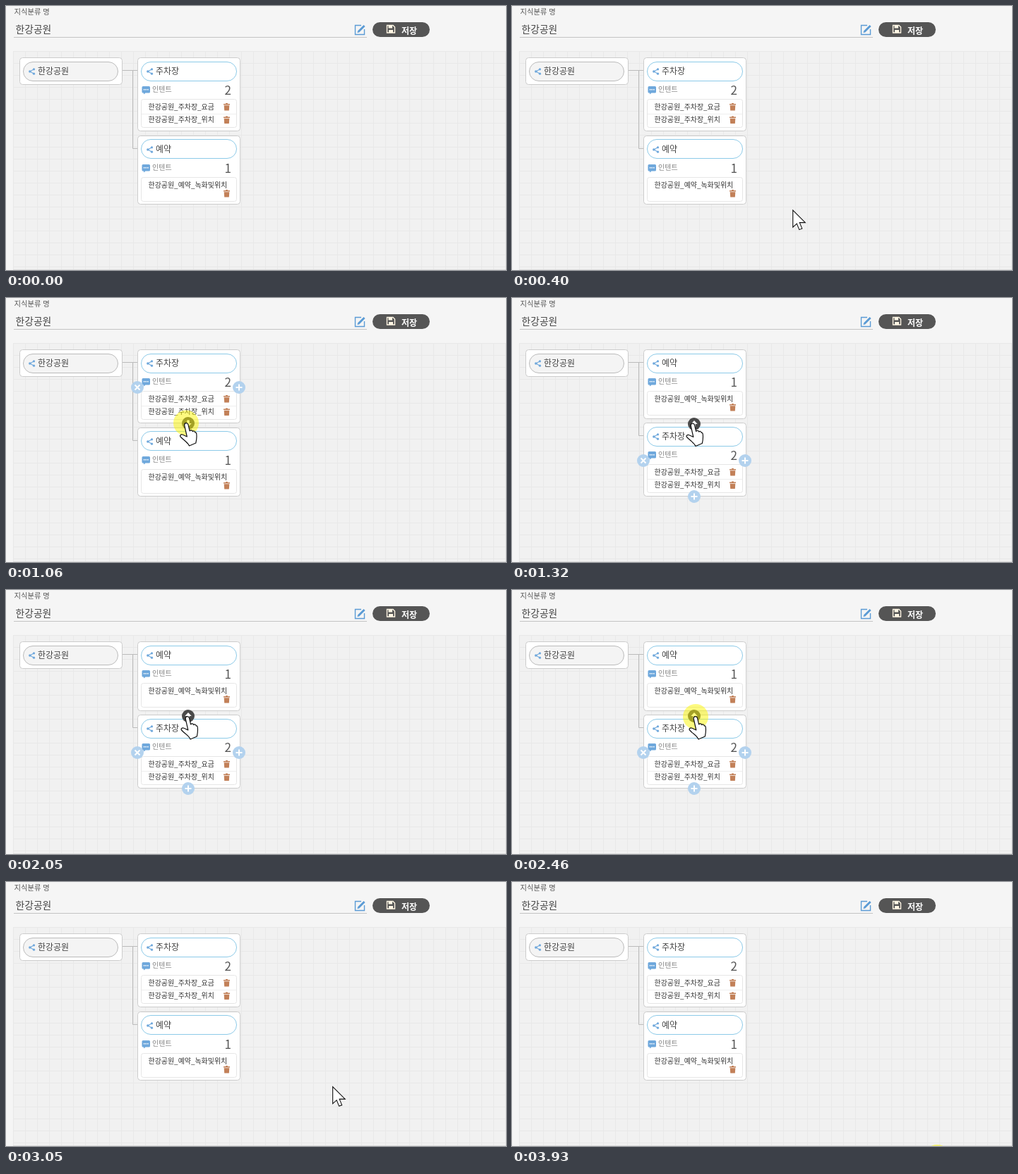
Animation of 708x375 px, one loop 3.99 s. Source, as an HTML page:

```html
<!DOCTYPE html>
<html lang="ko">
<head>
<meta charset="utf-8">
<style>
html, body { margin: 0; width: 100%; height: 100%; overflow: hidden; background: #f5f5f5; }
svg { display: block; font-family: "Noto Sans CJK KR", "Noto Sans", sans-serif; }
</style>
</head>
<body>
<svg width="708" height="375" viewBox="0 0 708 375">
  <defs>
    <pattern id="grid" x="10" y="64" width="17" height="17" patternUnits="userSpaceOnUse">
      <path d="M.5 0V17M0 .5H17" stroke="#e8e8e8" fill="none"/>
    </pattern>
    <g id="share" fill="#6fa8dc">
      <path d="M7.500 1.800L2 5L7.500 8.200" fill="none" stroke="#6fa8dc" stroke-width="1.100"/>
      <circle cx="7.500" cy="1.800" r="1.600"/><circle cx="1.800" cy="5" r="1.700"/><circle cx="7.500" cy="8.200" r="1.600"/>
    </g>
    <g id="chat">
      <path d="M1.500 0H10Q11.500 0 11.500 1.500V8Q11.500 9.500 10 9.500H5L2.500 11.500V9.500H1.500Q0 9.500 0 8V1.500Q0 0 1.500 0Z" fill="#6fa8dc"/>
      <path d="M2.300 4.800h1.600m1 0h1.600m1 0h1.600" stroke="#fff" stroke-width="1.600"/>
    </g>
    <path id="trash" d="M-4.500-4.500H-1.500V-5.500H1.500V-4.500H4.500V-3H-4.500ZM-3.800-2.200H3.800L3.300 5H-3.300Z" fill="#c28058"/>
    <path id="plus" d="M-4.500 0H4.500M0-4.500V4.500" stroke="#fff" stroke-width="2"/>
    <path id="cross" d="M-3.500-3.500L3.500 3.500M3.500-3.500L-3.500 3.500" stroke="#fff" stroke-width="2"/>
    <path id="down" d="M-1.700-4.500H1.700V0H4.700L0 5L-4.700 0H-1.700Z" fill="#fff"/>
    <path id="up" d="M-1.700 4.500H1.700V0H4.700L0-5L-4.700 0H-1.700Z" fill="#fff"/>
    <path id="arrow" d="M0 0V24L5.500 19L9 27.500L13 26L9.500 17.500H17.500Z" fill="#fff" stroke="#111" stroke-width="1.100"/>
    <path id="hand" d="M-2.800 2C-3.200-2 1.500-2.400 2.500 .8L4.600 9.800C6 8.300 8.300 8.800 8.800 10.600C10 9.300 12 10 12.200 12C13.500 11.500 14.200 12.800 14.300 14.500C14.800 19 14.500 22 13.300 27L4 31C2 26-4 23-8.500 18C-9.800 16-7.500 14-5 15.300L.8 18Z"
      fill="#fff" stroke="#111" stroke-width="1.200" stroke-linejoin="round"/>
  </defs>

  <rect width="708" height="375" fill="#f5f5f5"/>
  <rect x="10" y="64" width="698" height="311" fill="#f1f1f1"/>
  <rect x="10" y="64" width="698" height="311" fill="url(#grid)"/>
  <path d="M10 374.500H708" stroke="#ddd"/>

  <text x="11.500" y="12" font-size="10.300" fill="#555">지식분류 명</text>
  <text x="13.500" y="38" font-size="13.800" fill="#444">한강공원</text>
  <path d="M11 44.500H511" stroke="#c4c4c4"/>
  <g fill="none" stroke="#5b9bd5" stroke-width="1.400">
    <path d="M503 27.500H494.500V40.500H507.500V33"/>
    <path d="M499 36.500L507.500 28" stroke-width="3"/>
    <path d="M497.500 38L500 37.500L498 35.500Z" fill="#5b9bd5" stroke="none"/>
  </g>
  <rect x="519" y="23" width="81" height="21" rx="10.500" fill="#555"/>
  <path d="M539.500 27.500H548L550.500 30V38H539.500Z" fill="none" stroke="#fff6e4" stroke-width="1.400"/>
  <path d="M541.500 27.500H547V31.500H541.500ZM542 34H548V38H542Z" fill="#fff6e4"/>
  <text x="560" y="39.500" font-size="12" font-weight="700" fill="#fff">저장</text>

  <rect x="19.500" y="73.500" width="145" height="38" rx="4" fill="#fff" stroke="#ccc"/>
  <rect x="24.500" y="79.500" width="134" height="27" rx="13.500" fill="#f4f4f4" stroke="#bbb"/>
  <use href="#share" x="32" y="88"/>
  <text x="45" y="97" font-size="12" fill="#444">한강공원</text>

  <g id="scene"></g>
</svg>
<script>
const LOOP = 3990, TOP = 73.4, GAP = 5.4;
const parking = { name: '주차장', h: 104.8, rows: ['한강공원_주차장_요금', '한강공원_주차장_위치'] };
const booking = { name: '예약', h: 98.2, rows: ['한강공원_예약_녹화및위치'] };
const scene = document.getElementById('scene');

const use = (id, x, y) => `<use href="#${id}" x="${x}" y="${y}"/>`;
const text = (x, y, size, fill, s) =>
  `<text x="${x}" y="${y}" font-size="${size}" fill="${fill}">${s}</text>`;
// Borders snap to whole pixels at both ends
function box(x, y, w, h, r, stroke) {
  const top = Math.round(y), height = Math.round(y + h) - top;
  return `<rect x="${x + .5}" y="${top + .5}" width="${w - 1}" height="${height - 1}" rx="${r}" fill="#fff" stroke="${stroke}"/>`;
}
const button = (id, x, y, fill = '#b3d2ee') =>
  `<circle cx="${x}" cy="${y}" r="9" fill="${fill}"/>` + use(id, x, y);
const glow = (x, y) => `<circle cx="${x}" cy="${y}" r="18" fill="#fbf500" fill-opacity=".5"/>`;

function card({ name, h, rows }, top) {
  const pair = rows.length > 1, y = Math.round(top);
  return box(186, top, 146, h, 4, '#ccc') + box(191, top + 5.8, 136, 28, 13.5, '#8ccae8') +
    use('share', 199, y + 15) + text(212, y + 24, 12, '#444', name) +
    use('chat', 192.5, y + 41) + text(207, y + 49, 10, '#888', '인텐트') +
    text(309.500, y + 53, 17, '#555', rows.length) +
    box(191, y + 59, 136, pair ? 41 : 35, 3, '#e6e6e6') +
    (pair ? `<path d="M192 ${y + 80.5}H326" stroke="#eee"/>` : '') +
    rows.map((s, i) => text(201.5, y + 74 + 18 * i, 9.95, '#333', s) +
      use('trash', 312.5, y + (pair ? 70.5 + 18.5 * i : 82.5))).join('');
}

function buttons({ h }, y, last) {
  const middle = Math.round(y + h / 2 + 1.5), bottom = Math.round(y + h);
  return button('cross', 186, middle) + button('plus', 330, middle) +
    (last ? button('up', 258, y + 2, '#4a4a4a') + button('plus', 258, bottom)
          : button('down', 258, bottom, '#4a4a4a'));
}

const lerp = (a, b, p) => a + (b - a) * p;
const smooth = p => p * p * (3 - 2 * p);
const bend = (a, c, b, u) => lerp(lerp(a, c, u), lerp(c, b, u), u);
const step = (t, start, dt) => Math.floor((t - start) / dt + .01);

// Pointer tip at time t, or null while it is off stage
function pointer(t) {
  if (t < 260 || t >= 3340) return null;
  if (t < 740) {
    const p = smooth(Math.min(1, step(t, 260, 68.3) / 6));
    return [lerp(447, 257, p), lerp(328, 182, p)];
  }
  if (t < 1260) {
    const p = t < 810 ? 0 : Math.min(1, (step(t, 810, 83.3) + 1) / 4);
    return [lerp(257, 255.5, p), lerp(184, 179, p)];
  }
  if (t < 2050) return [256, 179.5];
  if (t < 2660) return [lerp(257, 260, Math.min(1, step(t, 2050, 70) / 2)), 181];
  if (t < 2920) return [261, 180];
  const u = [.12, .33, .55, .7, .8, .865][Math.min(5, step(t, 2920, 65))];
  return [bend(261, 460, 602, u), bend(180, 275, 391, u)];
}

function draw(t) {
  const swapped = t >= 1260 && t < 2660;
  const cards = swapped ? [booking, parking] : [parking, booking];
  const tops = [TOP, TOP + cards[0].h + GAP];
  const tip = pointer(t);
  const onButton = t >= 670 && t < 2660;
  let hover = -1;
  if (onButton) hover = swapped ? 1 : 0;
  else if (tip && tip[0] < 332 && tip[1] > tops[1]) hover = 1;

  const joint = Math.round(tops[1]) + 18.5;
  let out = `<path d="M165 91.500H186M179.500 91.500V${joint}H186" fill="none" stroke="#bbb"/>`;
  out += cards.map((c, i) => card(c, tops[i])).join('');
  if (hover >= 0) out += buttons(cards[hover], tops[hover], hover === 1);
  if (t >= 1060 && t < 1260) out += glow(255, 177.5);
  if (t >= 2460 && t < 2660) out += glow(260, 180);
  if (t >= 3930) out += glow(602, 391);
  if (tip) out += use(onButton ? 'hand' : 'arrow', ...tip);
  return out;
}

let shown = '';
const begin = performance.now();
function tick() {
  const next = draw((performance.now() - begin) % LOOP);
  if (next !== shown) scene.innerHTML = shown = next;
  requestAnimationFrame(tick);
}
tick();
</script>
</body>
</html>
```
